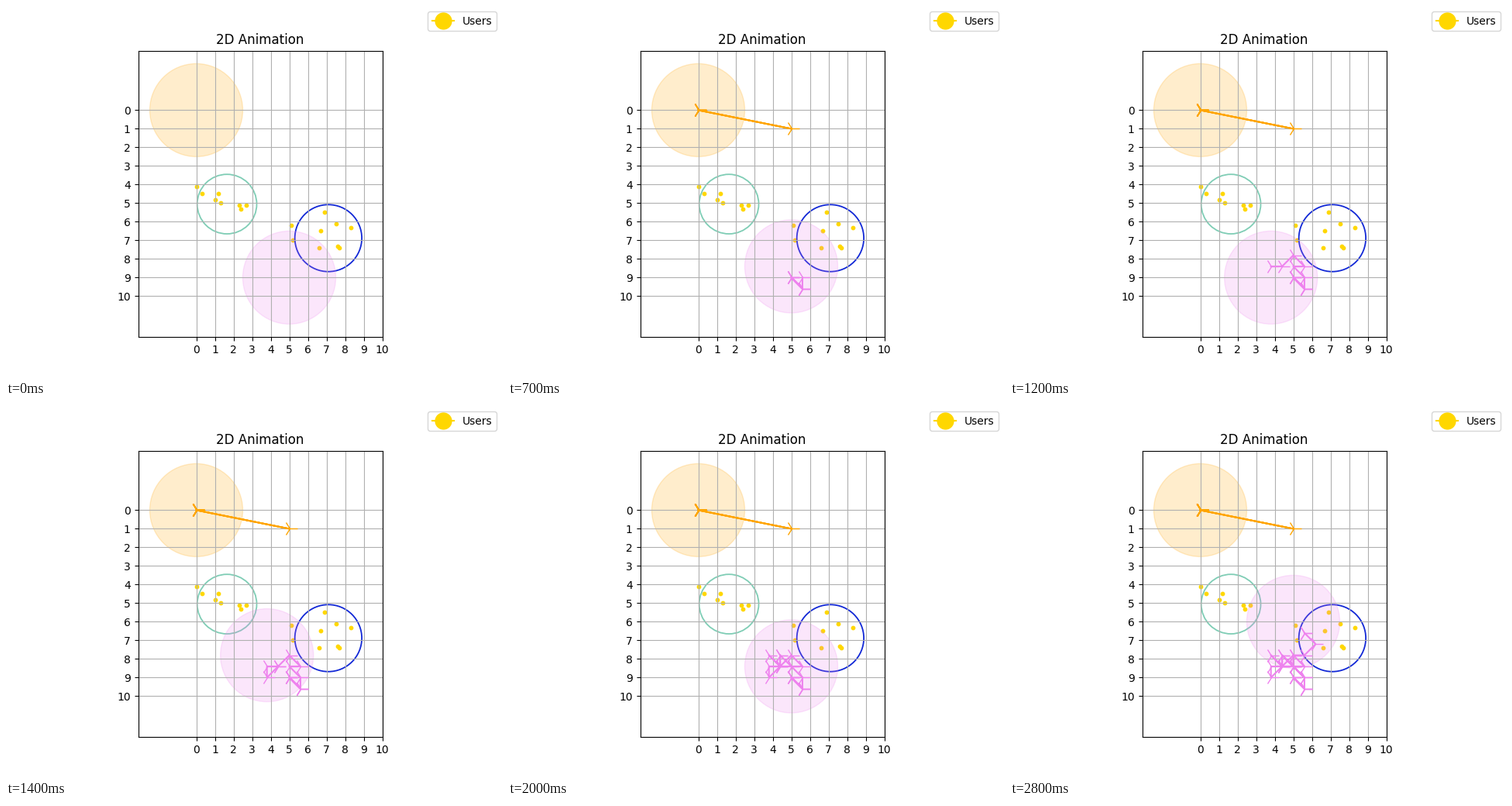
Animation of 640x480 px, one loop 2.9 s. Source, as a matplotlib script:

```python
import matplotlib.pyplot as plt
import numpy as np
from matplotlib.animation import FuncAnimation
from matplotlib.lines import Line2D
from matplotlib.patches import Circle

FRAMES = 29
INTERVAL = 100
STEP = 0.6
REACH = 2.5


def violet_stops():
    """Grid stops, in steps from the start: pacing, zigzag, loops, exit."""
    pacing = [(0, 0), (1, 1)] * 3
    zigzag = [(1 - i % 2, -((i + 1) // 2)) for i in range(4)]
    wide_loop = [(-1, -1), (-2, -1), (-2, 0), (-1, -1), (-2, -2)]
    tight_loop = [(-1, -1), (-1, -2), (0, -1)] * 2
    way_out = [(1, 0), (0, -1), (0, -2), (1, -2), (2, -3)]
    rest = [(1, -4)] * 2 + [(0, -5)]
    return np.array(pacing + zigzag + wide_loop + tight_loop + way_out + rest)


violet_path = np.array([5, 9]) + STEP * violet_stops()

# The orange agent leaves its corner for a single step.
away = np.arange(FRAMES) == 5
orange_path = np.outer(away, (5, 1))

left_users = [(0, 4.1), (0.3, 4.5), (1.2, 4.5), (1.0, 4.8),
              (1.3, 5.0), (2.3, 5.1), (2.4, 5.3), (2.7, 5.1)]
right_users = [(5.1, 6.2), (5.2, 7.0), (6.9, 5.5), (7.5, 6.1), (8.3, 6.3),
               (6.7, 6.5), (6.6, 7.4), (7.6, 7.3), (7.7, 7.4)]

fig, ax = plt.subplots(figsize=(6.4, 4.8), dpi=100)
# A hair off centre, so lines on half pixels all round the same way.
fig.subplots_adjust(left=0.12501)
ax.set_aspect("equal")
ax.set_title("2D Animation")
ax.set_xticks(range(11))
ax.set_yticks(range(11))
ax.set_xlim(-3.125, 10)
ax.set_ylim(12.2, -3.2)
ax.grid(True)


def add_cluster(points, center, radius, color):
    ax.scatter(*np.transpose(points), s=10, color="gold")
    ax.add_patch(Circle(center, radius, fill=False, ec=color, lw=1.3))


def add_agent(path, color):
    area = ax.add_patch(Circle(path[0], REACH, color=color, alpha=0.2))
    trail, = ax.plot([], [], color=color, marker="4", markersize=15)
    return path, area, trail


add_cluster(left_users, (1.65, 5.05), 1.6, "#7fcdb5")
add_cluster(right_users, (7.1, 6.88), 1.8, "#1228d6")
agents = [add_agent(orange_path, "orange"), add_agent(violet_path, "violet")]

key = Line2D([], [], color="gold", marker="o", markersize=15)
fig.legend([key], ["Users"], loc="upper right")


def update(i):
    for path, area, trail in agents:
        area.center = tuple(path[i])
        trail.set_data(path[:i, 0], path[:i, 1])
    return [artist for agent in agents for artist in agent[1:]]


anim = FuncAnimation(fig, update, frames=FRAMES, interval=INTERVAL,
                     repeat=True, repeat_delay=0)
plt.show()
```
